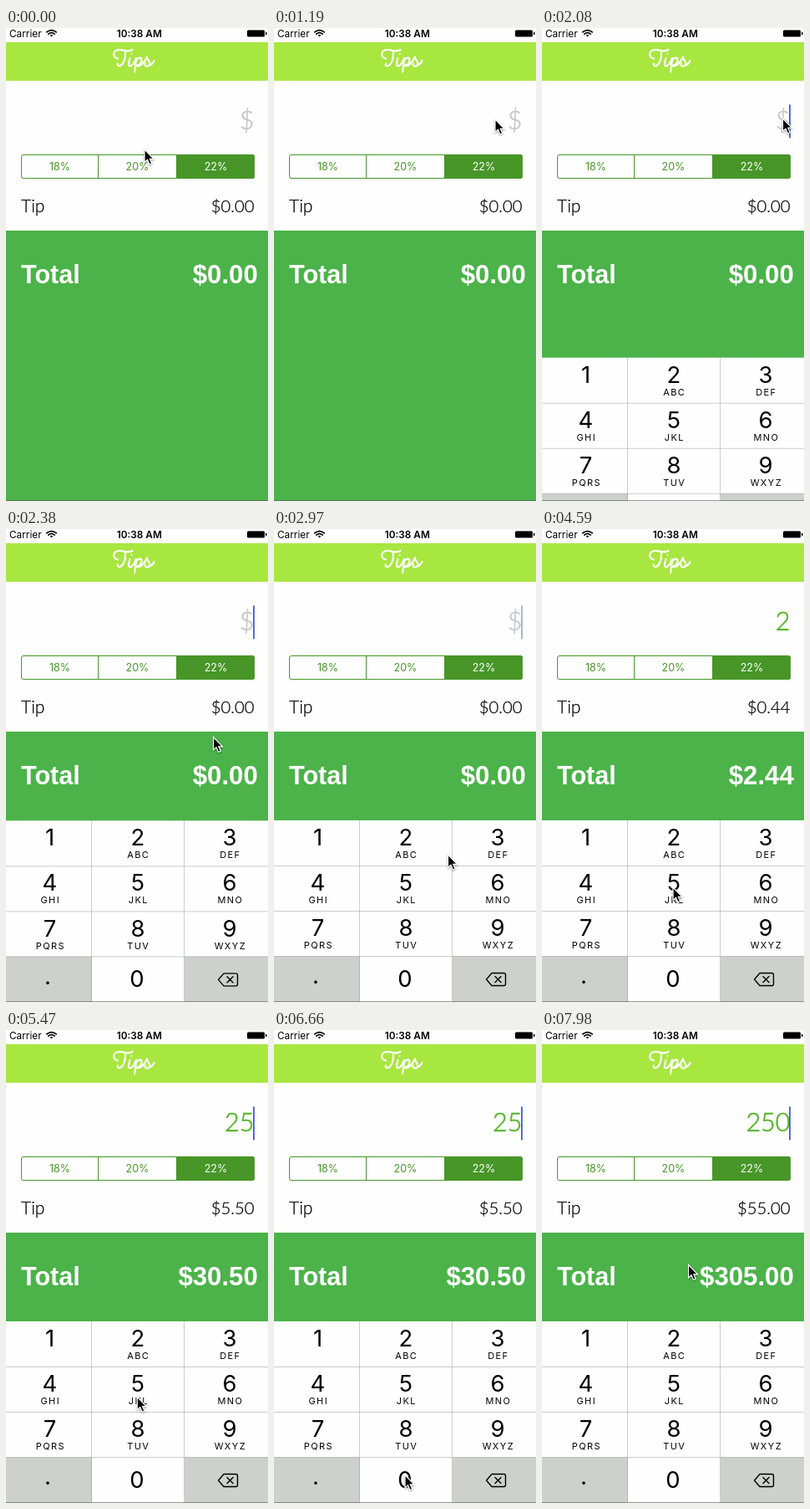
Recreate the animation shown at these times as an HTML page. Size 314 by 565 pixels, loop 8 s.

```html
<!DOCTYPE html>
<html lang="en">
<head>
<meta charset="utf-8">
<title>Tip calculator</title>
<style>
html, body { margin: 0; width: 100%; height: 100%; overflow: hidden; background: #fefefe; }
svg { display: block; width: 314px; height: 565px; }
.ui { font-family: Inter, Roboto, sans-serif; }
.thin { font-family: Lato, "Open Sans", sans-serif; font-weight: 300; fill: currentColor; stroke: currentColor; stroke-width: .25px; }
#bill { stroke-width: .6px; }
.bold { font: bold 31.2px "Liberation Sans", Arial, sans-serif; fill: #fff; }
.mid { text-anchor: middle; }
.end { text-anchor: end; }
.digit { font-size: 27.5px; }
.letters { font-size: 11px; letter-spacing: 1.4px; }
.line { fill: none; stroke-linecap: round; stroke-linejoin: round; }
</style>
</head>
<body>
<svg viewBox="0 0 314 565">
  <rect width="314" height="565" fill="#fefefe"/>

  <g class="ui" font-size="11.8">
    <text x="4" y="10.5">Carrier</text>
    <text x="159.8" y="10.5" class="mid" font-weight="600">10:38 AM</text>
  </g>
  <g class="line" stroke="#000" stroke-width="1.7" stroke-linecap="butt">
    <path d="M48.8 4.9Q54.5 .2 60.2 4.9M50.8 7.1Q54.5 4 58.2 7.1"/>
    <path d="M54.5 10.6L52.6 8.6Q54.5 7.2 56.4 8.6Z" fill="#000" stroke="none"/>
  </g>
  <rect x="289" y="2.5" width="21" height="8" rx="1.5"/>
  <rect x="311" y="4.7" width="1.5" height="3.6" rx=".7"/>

  <rect y="17" width="314" height="46" fill="#a8e640"/>
  <g class="line" stroke="#fff" stroke-width="2.2" role="img" aria-label="Tips" transform="translate(-1 -1)">
    <path d="M135 37.5C128 36 128.500 27 137.500 27C143 27 146 30.500 152.500 27"/>
    <path d="M144 29.500C144.500 36 142.500 43 139 45.500C136.500 47 134 46 135 43.500"/>
    <path d="M149.500 37C148 42 147 46.500 149.500 46.500C152 46.500 155 42 157 37C156.500 42 155.800 49 155 53.500"/>
    <path d="M156 42C157.500 36.500 163.500 34.500 163.500 39C163.500 44 159 47 156.500 45M158 46.300C164 46.500 168 40 170 35.500C169.500 39 175 41 173 45C171 48 166.500 46.500 168 43.500M173 45.500C175.500 45 177.500 42 178.500 40"/>
    <path d="M151.500 32V32.100"/>
  </g>

  <text id="bill" class="thin end" x="297.500" y="121" font-size="30.500"></text>
  <rect id="caret" x="296" y="91.500" width="2" height="40" fill="#4a6de0"/>

  <path d="M204 151H295a3 3 0 0 1 3 3V177a3 3 0 0 1-3 3H204Z" fill="#479627"/>
  <rect x="18.500" y="151.500" width="279" height="28" rx="2.500" fill="none" stroke="#479627"/>
  <path d="M110.500 152V180" stroke="#479627"/>
  <g class="ui mid" font-size="12.500" fill="#479627">
    <text x="64.500" y="170">18%</text>
    <text x="157.500" y="170">20%</text>
    <text x="251.500" y="170" fill="#fff">22%</text>
  </g>

  <text class="thin" x="18" y="220" font-size="21">Tip</text>
  <text id="tip" class="thin end" x="297.500" y="220" font-size="20.300"></text>

  <rect y="242" width="314" height="323" fill="#4bb349"/>
  <text class="bold" x="18" y="305" style="font-size: 30.600px">Total</text>
  <text id="total" class="bold end" x="301.800" y="305"></text>

  <g id="pad" class="ui"></g>
  <path d="M0 564.500H314" stroke="#555" stroke-opacity=".6"/>

  <path id="cursor" d="M0 0V15.500L3.500 12.300L6 18L8.700 16.800L6.300 11.300H11Z" stroke="#fff" stroke-width="1.200"
    style="filter: drop-shadow(0 1px 1px #0006)"/>
</svg>
<script>
const LOOP = 8000, STEP = 147.7;   // the screen refreshes once per STEP
const PAD_TOP = 348, ROW = 54.1;
const $ = id => document.getElementById(id);

// Cursor stops: step, x, y
const path = [
  [3, 166, 145], [8, 265, 109], [10, 290, 109], [11, 288.5, 108], [14, 288.5, 108],
  [18, 208.5, 389], [20, 208.5, 389], [22, 172, 443], [24, 157, 378], [27, 153, 378],
  [31, 157, 428], [36, 157, 428], [40, 158, 469], [43, 157, 531.5], [50, 157, 531.5],
  [54, 175.5, 280.5]
];
// Key taps: step at which the digit lands
const taps = [[26, "2"], [35, "5"], [47, "0"]];

const columns = [[0, 103, 52.5], [103, 111, 158], [214, 100, 268]];
const labels = ["", "ABC", "DEF", "GHI", "JKL", "MNO", "PQRS", "TUV", "WXYZ"];
const keys = ["1", "2", "3", "4", "5", "6", "7", "8", "9", ".", "0", "del"];

$("pad").innerHTML = keys.map((key, i) => {
  const [x, w, cx] = columns[i % 3], y = PAD_TOP + Math.floor(i / 3) * ROW;
  const gray = key === "." || key === "del";
  const back = `<rect id="key${i}" x="${x}" y="${y}" width="${w}" height="${ROW + 1}" fill="${gray ? "#cdd1cd" : "#fefefe"}"/>`;
  if (key === "del") return back +
    `<path class="line" stroke="#000" stroke-width="1.400" d="M254.500 538L261 530.500H275.500a2 2 0 0 1 2 2V543.500a2 2 0 0 1-2 2H261ZM265 534.500L272 541.500M272 534.500L265 541.500"/>`;
  const tx = key === "." ? 50 : i < 9 ? cx : 157;
  const digit = `<text class="digit mid" x="${tx}" y="${y + (key === "." ? 33 : i < 9 ? 30 : 36.5)}">${key}</text>`;
  return back + digit + (labels[i] ? `<text class="letters mid" x="${cx + .8}" y="${y + 45}">${labels[i]}</text>` : "");
}).join("") +
  `<path d="M102.500 348V565M213.500 348V565M0 402.500H314M0 456.500H314M0 510.500H314" stroke="#999" stroke-opacity=".5" fill="none"/>`;

function cursorAt(k) {
  const i = path.findIndex(p => p[0] > k);
  if (i === 0) return path[0].slice(1);
  if (i < 0) return path[path.length - 1].slice(1);
  const [a, ax, ay] = path[i - 1], [b, bx, by] = path[i], f = (k - a) / (b - a);
  return [ax + (bx - ax) * f, ay + (by - ay) * f];
}

// The blink restarts on every edit
function caretAlpha(k, start) {
  if (k < 13) return 0;
  const p = (k - start) % 7;
  return p < 4 ? 1 : p < 4.5 ? .5 : p < 6.7 ? 0 : .5;
}

function draw(now) {
  const k = Math.floor(now % LOOP / STEP);
  const done = taps.filter(t => t[0] <= k);
  const bill = done.map(t => t[1]).join("");
  const tip = bill * .22;

  $("bill").textContent = bill || "$";
  $("bill").style.color = bill ? "#55b327" : "#c7c7cc";
  $("tip").textContent = "$" + tip.toFixed(2);
  $("total").textContent = "$" + (+bill + tip).toFixed(2);
  $("caret").setAttribute("opacity", caretAlpha(k, done.length ? done[done.length - 1][0] : 13.2));

  const rise = Math.min(1, Math.max(0, (k - 12.3) / 4.2));
  $("pad").setAttribute("transform", `translate(0 ${217 * (1 - rise) ** 3})`);
  for (const [at, key] of taps)
    $("key" + keys.indexOf(key)).setAttribute("fill", k === at - 1 ? "#cdd1cd" : "#fefefe");

  $("cursor").setAttribute("transform", `translate(${cursorAt(k)})`);
  requestAnimationFrame(draw);
}
requestAnimationFrame(draw);
</script>
</body>
</html>
```
